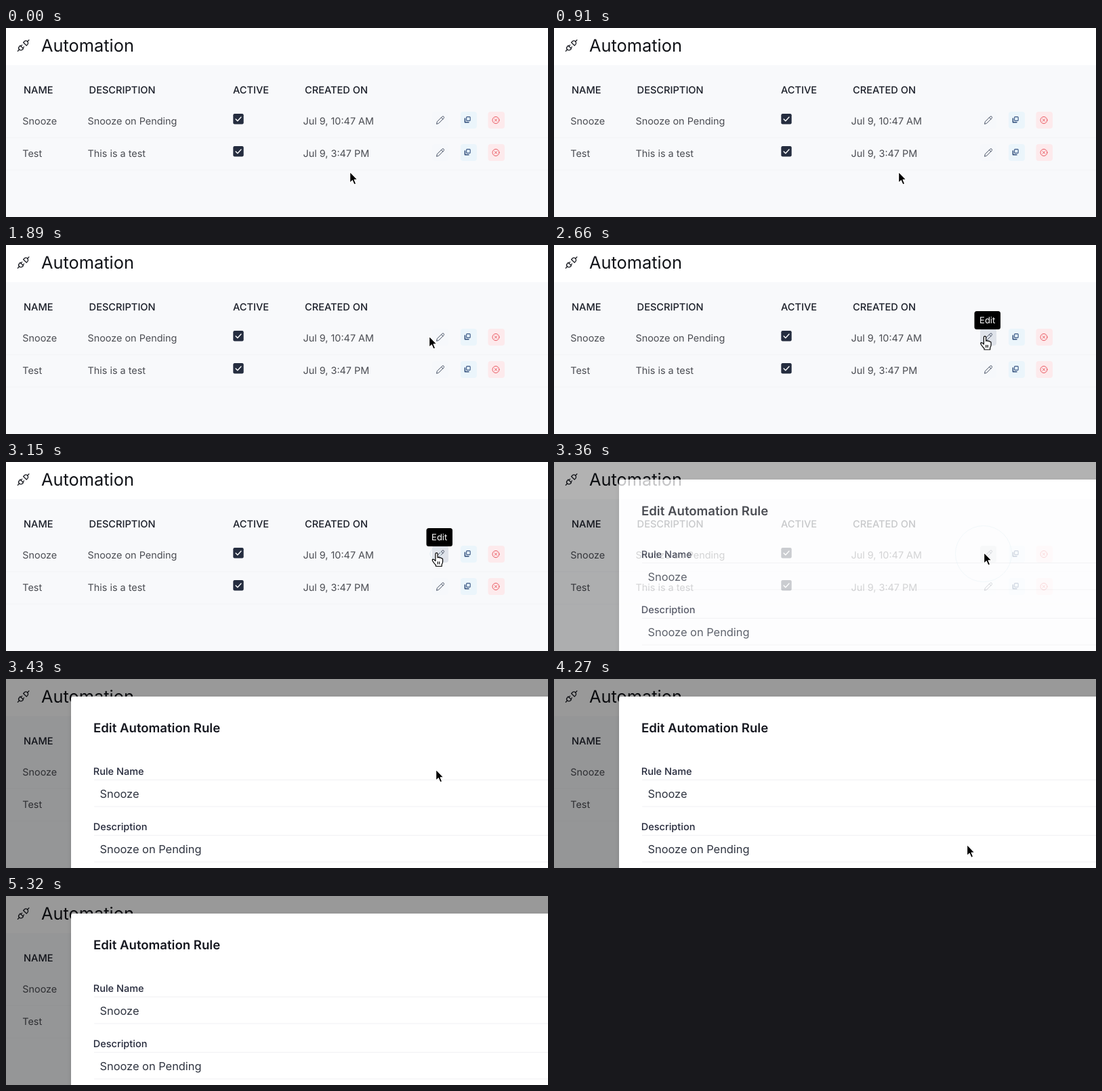
Recreate the animation shown at these times as an HTML page. Size 800 by 280 pixels, loop 5530 ms.

```html
<!DOCTYPE html>
<html lang="en">
<head>
<meta charset="utf-8">
<title>Automation</title>
<style>
  html, body { margin: 0; width: 100%; height: 100%; overflow: hidden; background: #fff; }
  svg { display: block; width: 800px; height: 280px; font-family: Inter, sans-serif; }
  text { text-rendering: geometricPrecision; }
  .title { font-size: 25.4px; fill: #111318; }
  .head { font-size: 14.6px; font-weight: 500; fill: #1a1e28; }
  .cell { font-size: 14.4px; fill: #4a4c52; }
  .tip { font-size: 13px; fill: #fff; text-anchor: middle; }
  .dialog { font-size: 18.6px; font-weight: 600; fill: #15171f; }
  .label { font-size: 14.5px; font-weight: 500; fill: #24283a; }
  .value { font-size: 16.4px; fill: #2f3440; }
  .line { fill: none; stroke-linecap: round; stroke-linejoin: round; }
</style>
</head>
<body>
<svg viewBox="0 0 800 280">
  <defs>
    <filter id="soft" x="-10%" y="-10%" width="120%" height="120%">
      <feDropShadow dx="0" dy="2" stdDeviation="3" flood-opacity=".12"/>
    </filter>
    <g id="check">
      <rect width="15.4" height="15.4" rx="2.2" fill="#252d3f"/>
      <path class="line" d="M3.8 8l2.7 2.7l5.2-5.6" stroke="#fff" stroke-width="1.4"/>
    </g>
    <g id="pencil" class="line" stroke="#4b5568" stroke-width="1">
      <path d="M-5.4 5.4l.8-3.2L2.8-5.1a1.6 1.6 0 0 1 2.3 2.3L-2.2 4.6zM1.5-3.8l2.3 2.3"/>
    </g>
    <g id="tools">
      <rect x="671" y="-12" width="24" height="25" rx="4" fill="#ebf5fb"/>
      <rect x="711.5" y="-12" width="24.5" height="25" rx="4" fill="#fdeaec"/>
      <path class="line" d="M677.4-2V3.8H683" stroke="#2c4a78" stroke-width="1.5"/>
      <rect x="679.6" y="-4.4" width="5.6" height="5.8" rx="1" fill="#e4f0f9" stroke="#3a5784" stroke-width="1.1"/>
      <g class="line" stroke="#ea5a62" stroke-width="1">
        <circle cx="723" cy=".5" r="5"/>
        <path d="M721.2-1.3l3.6 3.6m0-3.6l-3.6 3.6"/>
      </g>
    </g>
  </defs>

  <rect width="800" height="280" fill="#fff"/>
  <rect y="55" width="800" height="225" fill="#f8f9fb"/>
  <g class="line" transform="translate(14.6 15) scale(.92)" stroke="#1b1d24" stroke-width="1.4">
    <path d="M7 12l5 5l-1.5 1.5a3.5 3.5 0 1 1-5-5zM17 12l-5-5l1.5-1.5a3.5 3.5 0 1 1 5 5z"/>
    <path d="M3 21l2.5-2.5M18.5 5.5l2.5-2.5M10 11l-2 2M13 14l-2 2"/>
  </g>
  <text class="title" x="52" y="35">Automation</text>
  <g class="head">
    <text x="26" y="97">NAME</text>
    <text x="122.6" y="97">DESCRIPTION</text>
    <text x="335" y="97">ACTIVE</text>
    <text x="441" y="97">CREATED ON</text>
  </g>
  <rect id="hover" x="629" y="124" width="24" height="25" rx="4"/>
  <rect x="629" y="172" width="24" height="25" rx="4" fill="#f6f8fb"/>
  <g id="rows"></g>

  <g id="tooltip">
    <rect x="620.5" y="98" width="38.5" height="27" rx="3.5" fill="#000"/>
    <text class="tip" x="639.7" y="116">Edit</text>
  </g>

  <g id="modal">
    <path d="M0 0H800V280H0zM96 280H800V26H100a4 4 0 0 0-4 4z" fill-rule="evenodd" fill-opacity=".4"/>
    <rect x="96" y="26" width="760" height="300" rx="4" fill="#fff" filter="url(#soft)"/>
    <text class="dialog" x="129" y="79">Edit Automation Rule</text>
    <g id="fields"></g>
  </g>

  <circle id="ripple" cx="634" cy="136" fill="none" stroke="#dcebf2" stroke-width="1"/>
  <g id="cursor">
    <path id="arrow" d="M-.4 0V16.5L3.3 13L5.9 19L8.7 17.8L6.2 11.9H11z"
      fill="#000" stroke="#fff" stroke-width="1.2" stroke-linejoin="round"/>
    <path id="hand" d="M-1.6 1.8a1.6 1.6 0 0 1 3.2 0V7.2q1.5-1.3 2.9.3q1.6-.9 2.6.7q2-.2 2 1.8V13q0 2.4-1.4 4.2V20H-1V18.2Q-3.5 16-5.7 12.2Q-7 9.8-5 9.6Q-3.6 9.6-1.6 12zM1.7 13v4M4.2 13v4"
      fill="#fff" stroke="#000" stroke-width="1.2" stroke-linejoin="round"/>
  </g>
</svg>
<script>
  const LOOP = 5530, STEP = 70;
  const el = id => document.getElementById(id);

  const rows = [['Snooze', 'Snooze on Pending', 'Jul 9, 10:47 AM'], ['Test', 'This is a test', 'Jul 9, 3:47 PM']];
  el('rows').innerHTML = rows.map(([name, about, date], i) => `
    <g transform="translate(0 ${136 + 48 * i})">
      <text class="cell" x="24.3" y="6.5">${name}</text>
      <text class="cell" x="120.5" y="6.5">${about}</text>
      <use href="#check" x="335.3" y="-9"/>
      <text class="cell" x="438.5" y="6.5">${date}</text>
      <use href="#pencil" x="641" y=".5"/>
      <use href="#tools"/>
      <path d="M0 26.5H800" stroke="#f3f4f6"/>
    </g>`).join('');

  const fields = [['Rule Name', 'Snooze'], ['Description', 'Snooze on Pending']];
  el('fields').innerHTML = fields.map(([label, value], i) => `
    <g transform="translate(0 ${82 * i})">
      <text class="label" x="128.8" y="141.5">${label}</text>
      <path d="M130 149.5H800M130 189H800" stroke="#f1f1f3"/>
      <text class="value" x="138.5" y="176">${value}</text>
    </g>`).join('');

  // time, x, y
  const path = [
    [0, 508, 213], [70, 508, 213], [350, 509, 213], [910, 509, 213], [1120, 517, 206],
    [1400, 562, 171], [1680, 610, 143], [1890, 625, 135], [2030, 629, 135],
    [2240, 636, 135], [3080, 636, 135], [3220, 635, 134], [3920, 635, 134], [4410, 600, 290]
  ];

  const ramp = (t, from, to) => Math.min(1, Math.max(0, (t - from) / (to - from)));

  function place(t) {
    const i = path.findIndex(p => p[0] > t);
    if (i < 0) return path[path.length - 1].slice(1);
    const [a, b] = [path[i - 1], path[i]];
    const k = ramp(t, a[0], b[0]);
    return [a[1] + (b[1] - a[1]) * k, a[2] + (b[2] - a[2]) * k];
  }

  function draw(t) {
    const hand = t >= 2100 && t < 3220;
    el('cursor').setAttribute('transform', `translate(${place(t)})`);
    el('arrow').style.opacity = hand ? 0 : 1;
    el('hand').style.opacity = hand ? 1 : 0;
    el('hover').setAttribute('fill', t >= 2100 ? '#dfe3ea' : '#f6f8fb');
    el('tooltip').style.opacity = ramp(t, 2100, 2310) * (1 - ramp(t, 3150, 3290));
    el('modal').style.opacity = ramp(t, 3220, 3405);
    el('ripple').setAttribute('r', 8 + 33.5 * ramp(t, 3150, 3290));
    el('ripple').style.opacity = t < 3150 ? 0 : 1 - ramp(t, 3290, 3400);
  }

  let start;
  function tick(now) {
    start ??= now;
    const t = (now - start) % LOOP;
    draw(Math.floor(t / STEP) * STEP);
    requestAnimationFrame(tick);
  }
  draw(0);
  requestAnimationFrame(tick);
</script>
</body>
</html>
```
